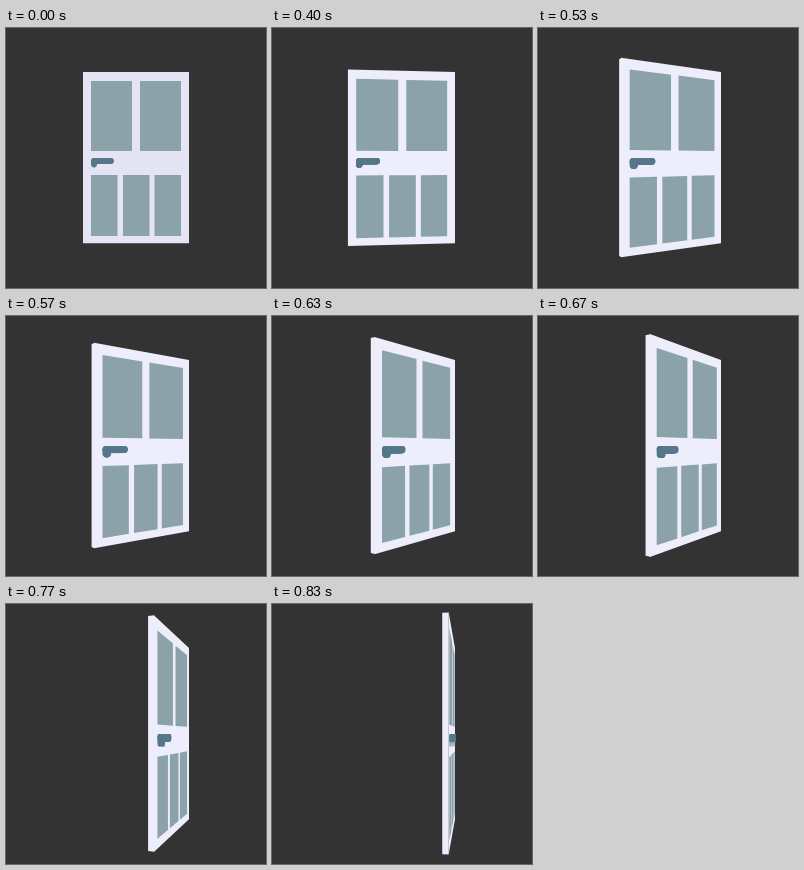
Write an HTML page with a canvas that moves like this. It is 260 by 260 pixels and loops after 2010 ms.

```html
<!DOCTYPE html>
<html lang="en">
<head>
<meta charset="utf-8">
<title>Opening door</title>
<style>
html, body { margin: 0; width: 100%; height: 100%; overflow: hidden; background: #333; }
canvas { display: block; }
</style>
</head>
<body>
<canvas id="stage" width="260" height="260"></canvas>
<script>
const ctx = document.getElementById('stage').getContext('2d');
const LOOP = 2010, START = 400, STEPS = 14, STEP_ANGLE = 5.65 * Math.PI / 180;
const HINGE = 183, LEFT = 77, TOP = 44, BOTTOM = 215.3;
const CENTER = 130, CAMERA = 355, THICKNESS = 4.5, HANDLE_DEPTH = 4;
const GLASS = '#8aa2a8', HANDLE = '#547889';
const PANES = [
  [85, 53, 126, 123], [134, 53, 175, 123],
  [85, 147, 111.5, 208], [117, 147, 143.5, 208], [148.5, 147, 175, 208]
];
let angle = 0;

// Projects a door point; depth is measured outward from the front face.
function project([x, y, depth = 0]) {
  const reach = HINGE - x, c = Math.cos(angle), s = Math.sin(angle);
  const scale = CAMERA / (CAMERA - reach * s - depth * c);
  const px = HINGE - reach * c + depth * s;
  return [CENTER + (px - CENTER) * scale, CENTER + (y - CENTER) * scale];
}

function polygon(points, color) {
  ctx.fillStyle = color;
  ctx.beginPath();
  for (const p of points) ctx.lineTo(...project(p));
  ctx.fill();
}

function rect(x1, y1, x2, y2, color) {
  polygon([[x1, y1], [x2, y1], [x2, y2], [x1, y2]], color);
}

function capsule(x1, y1, x2, y2, r, depth) {
  const dir = Math.atan2(y2 - y1, x2 - x1), points = [];
  for (let i = 0; i < 24; i++) {
    const a = dir + Math.PI / 2 + i * Math.PI / 11 - (i > 11 ? Math.PI / 11 : 0);
    const [x, y] = i < 12 ? [x1, y1] : [x2, y2];
    points.push([x + r * Math.cos(a), y + r * Math.sin(a), depth]);
  }
  polygon(points, HANDLE);
}

function draw(t) {
  const tick = Math.floor((t - START) / 10);
  const step = tick < 0 ? 0 : Math.min(STEPS, 1 + Math.floor((tick + 0.5) * 0.3));
  angle = step * STEP_ANGLE;
  const paint = step ? '#ededfb' : '#e4e4f4';

  ctx.fillStyle = '#333';
  ctx.fillRect(0, 0, 260, 260);
  if (step) {
    polygon([[LEFT, TOP, -THICKNESS], [LEFT + 0.5, TOP], [LEFT + 0.5, BOTTOM],
      [LEFT, BOTTOM, -THICKNESS]], paint);
  }
  rect(LEFT, TOP, HINGE, BOTTOM, paint);
  for (const pane of PANES) rect(...pane, GLASS);
  for (let depth = 0; depth <= (step ? HANDLE_DEPTH : 0); depth += 0.5) {
    capsule(88, 133, 105, 133, 3, depth);
    capsule(88, 133, 88, 136.5, 3, depth);
  }
}

const begin = performance.now();
function frame() {
  draw((performance.now() - begin) % LOOP);
  requestAnimationFrame(frame);
}
frame();
</script>
</body>
</html>
```
